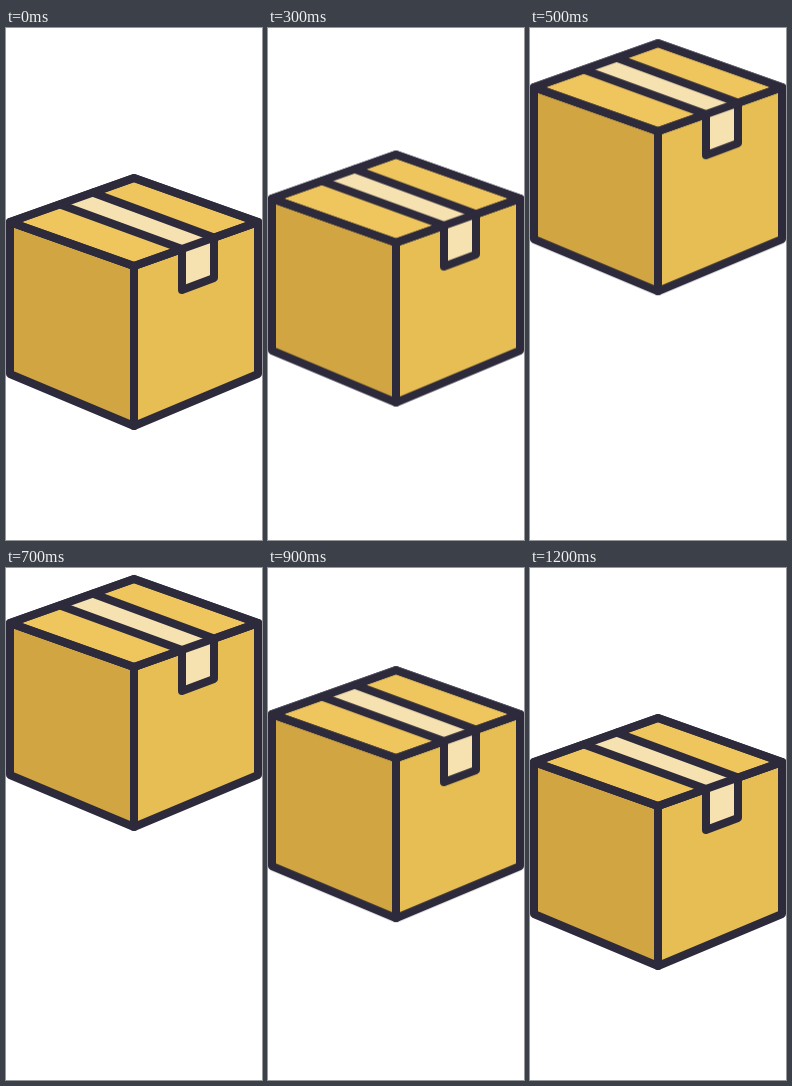
Write an HTML page that moves like this. It is 256 px wide and 512 px high and loops after 1.3 s.

```html
<!DOCTYPE html>
<html lang="en">
<head>
<meta charset="utf-8">
<title>Bouncing box</title>
<style>
  html, body { margin: 0; width: 100%; height: 100%; overflow: hidden; background: #fff; }
  svg { display: block; width: 256px; height: 512px; }
  #box { stroke: #2d2a3b; stroke-width: 8; stroke-linejoin: round; stroke-linecap: round; }
</style>
</head>
<body>
<svg viewBox="0 0 256 512">
  <g id="box">
    <path fill="#d1a541" d="M4 194 128 238V398L4 346Z"/>
    <path fill="#e6be53" d="M252 194 128 238V398L252 346Z"/>
    <path fill="#efc55d" d="M128 150 252 194 128 238 4 194Z"/>
    <path fill="#f6e1b0" d="M54 176.5 87 164.7 208 209.6V250L176 262V221Z" stroke="none"/>
    <path fill="none" d="M54 176.5 176 221 M87 164.7 208 209.6 M176 221V262L208 250V209.6"/>
    <path fill="none" d="M128 150 252 194 128 238 4 194Z"/>
  </g>
</svg>
<script>
const LOOP = 1300, STEP = 50, LIFT = 140;
const rise = { from: 50, to: 600, x1: 0.9, x2: 0.351 };
const fall = { from: 650, to: 1200, x1: 0.685, x2: 0.088 };

// Progress along a cubic curve that is flat at both ends.
function progress(leg, time) {
  const p = Math.min(1, Math.max(0, (time - leg.from) / (leg.to - leg.from)));
  if (p === 0 || p === 1) return p;
  let lo = 0, hi = 1;
  for (let i = 0; i < 40; i++) {
    const s = (lo + hi) / 2, r = 1 - s;
    const x = 3 * r * r * s * leg.x1 + 3 * r * s * s * leg.x2 + s * s * s;
    if (x < p) lo = s; else hi = s;
  }
  return lo * lo * (3 - 2 * lo);
}

const count = LOOP / STEP;
const steps = Array.from({ length: count + 1 }, (_, i) => {
  const time = i * STEP;
  const y = LIFT * (progress(fall, time) - progress(rise, time));
  return { offset: i / count, transform: `translateY(${y.toFixed(2)}px)`, easing: "steps(1, end)" };
});

document.getElementById("box").animate(steps, { duration: LOOP, iterations: Infinity });
</script>
</body>
</html>
```
